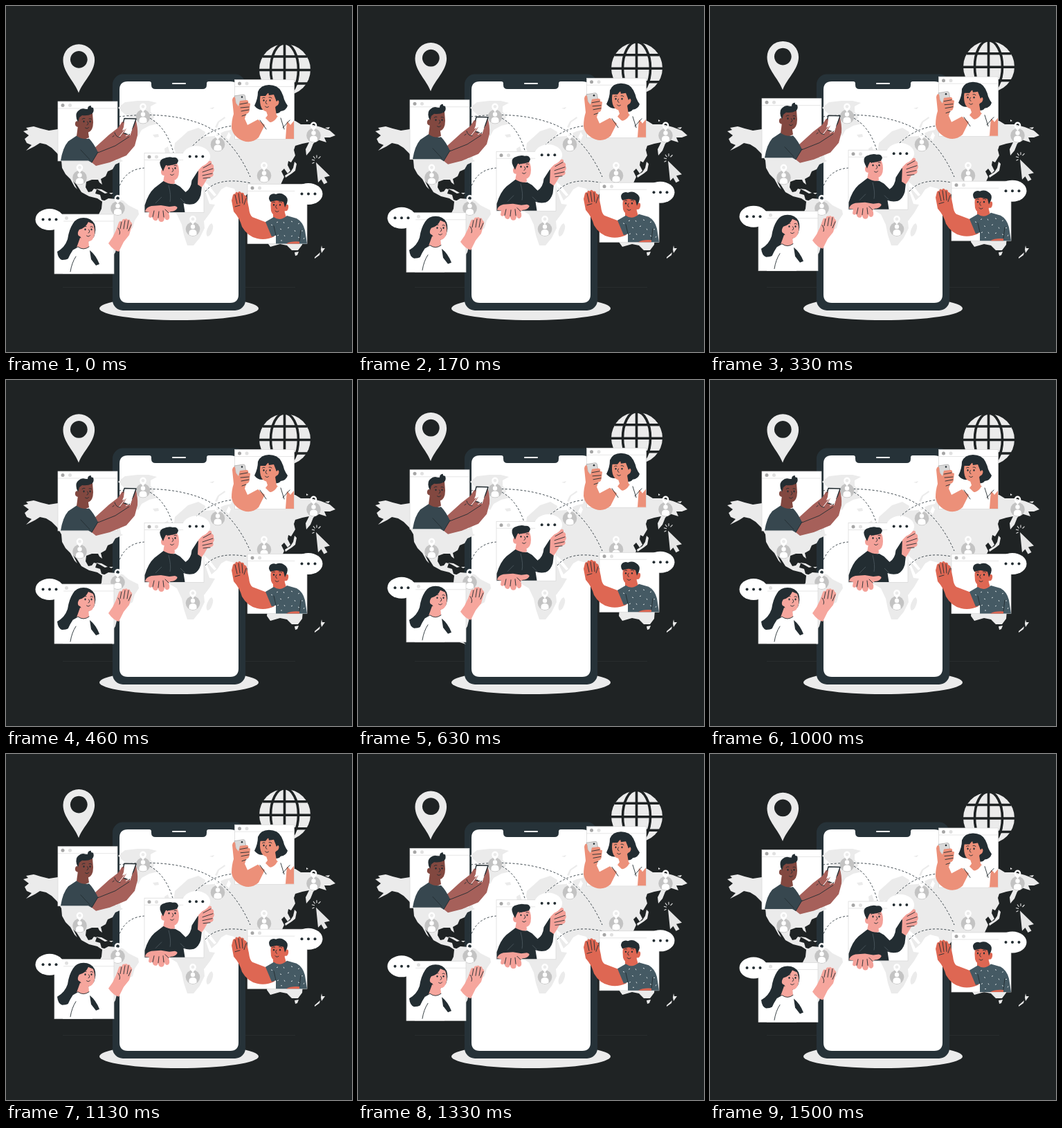
Recreate the animation shown at these times as an HTML page. Size 500 by 500 pixels, loop 1540 ms.

```html
<!DOCTYPE html>
<html lang="en">
<head>
<meta charset="utf-8">
<title>Video call around the world</title>
<style>
  html, body { margin: 0; width: 100%; height: 100%; overflow: hidden; background: #1f2324; }
  svg { display: block; width: 100vw; height: 100vh; }
  .ink { fill: #232d32; }
  .line { fill: none; stroke: #232d32; stroke-width: .9; stroke-linecap: round; stroke-linejoin: round; }
  .route { fill: none; stroke: #263238; stroke-width: .9; stroke-dasharray: 3 2.5; }
  .brown { fill: #824840; } .brownArm { fill: #a6605a; }
  .peach { fill: #ec9079; } .pink { fill: #f4a199; } .rose { fill: #f6a69d; } .red { fill: #de6753; }
</style>
</head>
<body>
<svg viewBox="0 0 500 500">
  <defs>
    <g id="window">
      <rect width="86" height="86" fill="#fff" stroke="#d6d6d6" stroke-width=".7"/>
      <path d="M0 10H86" stroke="#dcdcdc" stroke-width=".7"/>
      <circle cx="7" cy="5.5" r="2.5" fill="#a6a6a6"/>
      <circle cx="17.5" cy="5.5" r="2.5" fill="#e0e0e0"/>
    </g>
    <g id="bubble">
      <ellipse rx="20.5" ry="15.5" fill="#fff"/>
      <g class="ink"><circle cx="-9.5" r="2"/><circle r="2"/><circle cx="9.5" r="2"/></g>
    </g>
    <g id="person">
      <circle r="10.3" fill="#c3c3c3"/>
      <g fill="#fff">
        <circle cy="-3.5" r="3.2"/>
        <path d="M-5.5 8V5q0-4.5 5.500-4.500T5.500 5v3Q0 11-5.500 8Z"/>
        <path fill-rule="evenodd" d="M0-6C-1.500-9.500-4.800-11-4.800-14.600a4.800 4.800 0 0 1 9.600 0C4.800-11 1.500-9.500 0-6ZM0-17a2.400 2.400 0 1 0 .01 0Z"/>
      </g>
    </g>
    <g id="face">
      <g class="ink"><ellipse cx="-5" cy="-2" rx="1.1" ry="1.4"/><ellipse cx="4" cy="-2" rx="1.1" ry="1.4"/></g>
      <path class="line" d="M-7.500-5.500q2-2 4-1M2.500-6q2-1 3.500.5M0-2q3 4-.5 5M-3 7q3 2.500 5-.5"/>
    </g>
  </defs>

  <path d="M82 406.500H418" stroke="#2b3032" stroke-width=".8"/>
  <ellipse cx="250" cy="437" rx="115" ry="17" fill="#ebebeb"/>
  <rect x="154" y="98.500" width="192" height="341.500" rx="15" fill="#263238"/>
  <path fill="#fff" d="M176 109H207q3 0 3 3v2q0 6 6 6H284q6 0 6-6v-2q0-3 3-3H324q12 0 12 12V417q0 12-12 12H176q-12 0-12-12V121q0-12 12-12Z"/>
  <path d="M241 112H259" stroke="#fff" stroke-width="2" stroke-linecap="round"/>

  <!-- world map -->
  <g fill="#ebebeb">
    <path d="M25 181L32 179 29 176 40 174 50 177 62 180 75 178 140 176 162 192 166 222 169 224 158 229 154 236 147 239 144 246 137 250 139 258 135 255 133 251 124 251 116 254 115 262 119 269 124 268 127 264 131 265 129 271 136 273 138 280 148 283 141 284 132 278 120 275 109 269 102 258 97 253 103 265 99 261 93 250 86 243 81 234 80 223 74 213 66 205 58 200 49 198 41 203 29 209 37 201 30 198 27 192 33 187Z"/>
    <path d="M130 264l8 1 9 5-4 1-7-4ZM149 270l6 0-3 2Z"/>
    <path d="M139 283l9-5 11 1 10 2 8 7 14 7 1 6-6 9-3 11-9 5-5 9-8 9-3 12-6 9-2 12 6 5-9-3-3-20 2-23-9-17-4-16 5-10Z"/>
    <path d="M162 147l10-8 18-2 16 0 12 3-9 5 0 8 6 6-3 5 8 6-13 3-11 6-5 9-5-4-1-12-6-10-10-8Z"/>
    <path d="M212 186l8-1 1 4-6 1ZM229 206l5-3 3 9-7 2ZM294 148l7-2-2 3Z"/>
    <path d="M302 175l4-8 10-7 1 2-9 6-3 8Z"/>
    <path d="M243 206L244 198 253 190 263 181 278 176 288 182 286 189 300 188 316 181 325 179 330 166 418 166 426 171 440 171 455 175 468 180 476 187 468 190 460 190 463 197 450 193 444 199 440 209 434 216 433 207 438 197 428 199 418 202 416 208 418 216 412 226 408 224 407 230 411 238 407 242 402 235 398 239 402 247 397 258 385 270 350 270 338 285 330 264 318 261 311 265 305 274 297 281 288 262 284 250 276 225 250 222 254 209 262 203 264 194 272 188 270 197 262 208 246 214Z"/>
    <path d="M225 262L286 262 294 286 302 287 295 299 286 311 287 321 280 335 271 346 262 346 257 331 254 316 247 301 235 294Z"/>
    <path d="M297 314q4 3 1 11t-7 8q-3-4 0-11t6-8Z"/>
    <path d="M417 225l3 3-2 10-5 4-9 6-1-3 8-5 4-6ZM434 164l3 2-3 1ZM461 176l7-1-2 3Z"/>
    <path d="M378 330l12-12 14-4 8 3 8-2 9 18-1 12-6 8-9 0-7-7-10-2-14 4-5-7ZM417 356l6-1-2 5-3 1Z"/>
    <path d="M456 346l1 4 4 0-5 7-1-5ZM454 356l-1 4-7 5 0-2Z"/>
  </g>
  <path fill="#fff" d="M286 253l8 7 10 13-3 2-10-11-7-7ZM318 190l4-8 3 5-3 7Z"/>
  <g class="route">
    <path d="M163 160Q230 152 278 169T353 247"/>
    <path d="M198 158Q230 168 242 212"/>
    <path d="M161 270Q169 235 202 234"/>
    <path d="M266 206Q294 175 331 173"/>
    <path d="M288 268Q306 246 354 256"/>
  </g>
  <use href="#person" x="198" y="160"/>
  <use href="#person" x="106.500" y="248"/>
  <use href="#person" x="161.500" y="292.500"/>
  <use href="#person" x="306" y="200"/>
  <use href="#person" x="444.500" y="187"/>
  <use href="#person" x="373" y="245"/>
  <use href="#person" x="270" y="322.500"/>

  <g id="floating">
    <path fill="#ebebeb" fill-rule="evenodd" d="M105 125.500C99 109 82.500 96 82.500 78a22.800 22.800 0 0 1 45.600 0C128 96 111 109 105 125.500ZM105.300 65a12.400 12.400 0 1 0 .01 0Z"/>

    <circle cx="403" cy="92" r="37" fill="#ebebeb"/>
    <g fill="none" stroke="#1f2324" stroke-width="3.600">
      <path d="M402.500 54V130M365 92.500H441M371 73H435M371 112H435"/>
      <ellipse cx="402.500" cy="92" rx="20" ry="38"/>
    </g>

    <path fill="#e6e6e6" d="M448 226l20 19.500-8 2 4.500 7.500-5 2.500-4-7-4.500 4.500Z"/>
    <path d="M442 222l4 1M444 217l2.500 3.500M449 215.500v4M454.500 217.500l-3 3M442.500 227.500l3-1.500" stroke="#e6e6e6" stroke-width="1.100"/>

    <!-- man with phone -->
    <use href="#window" x="75" y="138"/>
    <path class="brown" d="M104 173l14 4 2 13-9 4-9-6Z"/>
    <path class="brown" d="M103 158q9-9 22-3l1 13q0 13-8 15-9 1-14-8-5-1-4-6 1-4 4-2Z"/>
    <path class="ink" d="M104 168l-2-5q-2-9 3-12 4-4 10-2l3 0q0-5 5-5-1 3 3 3 2 6-2 9-6 3-14 2l-4 3Z"/>
    <use href="#face" x="117.500" y="169"/>
    <path class="brownArm" d="M127 206l22-20 13-10 6-9 6 4 7-1 6-7q4 13 3 24l-4 15-12 14-24 10-20 5-10-8Z"/>
    <path fill="#37474f" d="M79 223.500q3-19 11-28l12-8q8 6 18 4 7 7 13 20l-9 15-5-3Z"/>
    <path class="line" d="M121 222l-13-14M133 211l-9 15M133 212l25-10 20-13M154 189l12-9"/>
    <path d="M171 162.500l17 .5-8 23-14-3Z" fill="#fff" stroke="#232d32" stroke-width="1.400" stroke-linejoin="round"/>
    <path class="brownArm" d="M156 185l9-12 6-6-1 8-2 5 6-3-4 7-6 5-7 1ZM184 175l4 3 0 7-6 5-4-1Z"/>
    <path d="M163 190l7-9 3-4M173 188l5-3-4-1M182 178l-3 9" fill="none" stroke="#fff" stroke-width="1"/>
    <path class="line" d="M157 183q2 7 8 7"/>

    <!-- woman taking a selfie -->
    <use href="#window" x="330.500" y="106.500"/>
    <path class="ink" d="M364 124q4-10 16-10 13 0 18 10 3 6 4 11 2 5 5 9-2 7-10 8-3 4-9 3l-16-5q-8 1-13-6 5-10 5-20Z"/>
    <path class="peach" d="M375 149l14-3 2 12 4 4-12 8-8-8 3-4ZM399 165q9 1 12 7l5-6v26h-14Z"/>
    <path class="peach" d="M368 128q10-1 19-5l4 15 2-2q3 2 0 7l-3 2q-4 8-12 8-8-1-10-9-2-8 0-16Z"/>
    <path class="ink" d="M365 130q4-12 16-11 9 1 12 15l-2 4-4-10-7 1-1-4-4 5Z"/>
    <use href="#face" transform="translate(376.500 138.500) scale(-1 1)"/>
    <path fill="#fff" d="M361 192q1-19 13-30 3 6 9 6 6-2 9-8 8 1 14 5l-2 27Z"/>
    <path fill="#d9d9d9" stroke="#999" stroke-width=".6" d="M330 130l13-2q2 0 2.500 2l2.500 15-14 3Z"/>
    <circle cx="341" cy="131.500" r="1.300" class="ink"/>
    <path class="peach" d="M327 136q1-6 4-4l1 8 4 5 2-8 9-1q4 0 3 4l3 1-1 8q0 6-5 7l-2 7 4 9 15-8 10 8-9 18q-10 9-22 5-15-6-17-19 0-11 3-20Z"/>
    <path class="line" d="M338 142l11-2M339 147l12-1M340 152l11-2M347 157l-6 2M397 162l5 16M367 165l9 13M400 176l10-11"/>

    <!-- man grabbing the frame -->
    <use href="#window" x="200" y="212.500"/>
    <path class="pink" d="M229 243l14 3 1 10-8 4-9-5Z"/>
    <path class="pink" d="M227 230l18-5q5 4 5 14 0 12-8 13-8 1-13-7-5 0-5-5t4-4Z"/>
    <path class="ink" d="M227 239l-3-6q-4-9 2-12 9-4 15-2 7-1 8 5l-2 4q-9 3-16 2l-2 4Z"/>
    <use href="#face" x="240.500" y="236.500"/>
    <path class="ink" d="M200.500 298V288q5-17 14-25l13-10q8 5 17 4l7 4 8 8q8-5 9-17l9-14 6 18-2 17q-3 10-10 13-8 2-15-1l2 13Z"/>
    <path d="M216 285l9-9M235 259q4 15 2 24M252 278l7 7" stroke="#56646b" stroke-width=".7" fill="none"/>
    <path class="pink" d="M278 237l7-7 8-6q5-1 4 4 4 1 3 6 2 3-1 7 2 4-2 6l-6 2-4 7-4 6-6-4Z"/>
    <path class="line" d="M285 234l11-6M284 240l15-5M284 245l14-3M285 249l10-1"/>
    <path class="pink" d="M201 297q1-6 9-8l14-1 12 2 8-1q5 1 3 4-3 4-9 4l-3 2q3 8-1 10-4 1-5-4 0 7-4 7-5 0-5-6-1 5-5 4-4-2-3-6-4 4-6 0l1-6Z"/>
    <path class="line" d="M212 305l2-9M220 306l1-9M228 305l-1-9M235 299l-5-5"/>

    <!-- woman waving -->
    <use href="#window" x="70" y="301"/>
    <path class="ink" d="M97 314q5-8 15-8 11 0 16 9 3 8-1 19l-17 14q-8 3-11 10-7 9-18 9-6-2-7-12 11-6 15-18 2-14 8-23Z"/>
    <path class="rose" d="M107 335l12 2 1 11-7 6-11-5Z"/>
    <path class="rose" d="M106 323q9-2 13-11l7 3q3 8 2 15-2 10-9 10-8 0-12-7-4-1-3-6 1-3 2-4Z"/>
    <use href="#face" x="119.500" y="325"/>
    <path fill="#fff" d="M82 387q6-22 15-35l7-4q8 6 16 0 6 4 6 12l-1 27Z"/>
    <path class="line" d="M93 384q2-13 8-22M97 352l7-4q8 6 16 0"/>
    <path class="ink" d="M121 353q9 7 14 20l-5 2-7-9Z"/>
    <path class="rose" d="M148 343q7-9 11-19l4-11q2-4 4-1 1-5 5-4 2-2 4 1 3-2 4 3 3 1 2 5l-4 14-8 10-7 14Q155 353 148 343Z"/>
    <path class="line" d="M167 312l-2 10M172 310l-2 12M177 310l-2 12M181 316l-4 9M162 321q4 5 2 9"/>

    <!-- man in patterned shirt -->
    <use href="#window" x="349" y="257.500"/>
    <path class="red" d="M326 281l2-8q2-3 3-1 1-5 4-2 2-4 5 0 4-1 4 3 4 1 4 5l3 14q1 10 5 13l21 8 9 3 2 17q-13 6-25 3-14-3-22-17-3-12-12-22Z"/>
    <path class="line" d="M331 273l3 13M336 271l2 14M341 272l1 13M347 278l-3 9M331 290l7-2"/>
    <path class="red" d="M386 297l16-2 3 11-8 6-11-5Z"/>
    <path class="red" d="M383 280l21-1 1 8q4-1 3 5-1 5-5 4-3 8-11 8-7-1-9-8-1-8 0-16Z"/>
    <path class="ink" d="M382 283q-4-6 0-10 4-3 8-1 7-3 12 1 7 4 4 12l-3 6-2-8-10-2Z"/>
    <use href="#face" transform="translate(391 289.500) scale(-1 1)"/>
    <path fill="#455a64" d="M375 312l12-7q9 7 19-2l14 4q9 5 12 17l3 19.500h-45v-12l-6 2Z"/>
    <path d="M383 316l2 1M391 313l2-1M401 312l1 2M412 311l2 1M422 315l2-1M396 322l2 1M407 321l2-1M417 324l1 2M427 325l2 0M392 332l2-1M402 331l1 2M412 333l2-1M422 334l2 1M397 339l2 0M430 337l1-2" stroke="#d3dadd" stroke-width="1"/>
    <path class="line" d="M390 331l-3-13M424 340l2-16"/>
    <path class="red" d="M405 343.500q7-4 19-3v3Z"/>

    <use href="#bubble" transform="translate(275 217.500) scale(.98)"/>
    <use href="#bubble" x="63" y="308.500"/>
    <use href="#bubble" x="437" y="271.500"/>
  </g>
</svg>
<script>
  const LOOP = 1540, LIFT = 10, LEAD = 40;
  const floating = document.getElementById('floating');

  function draw() {
    const phase = ((performance.now() + LEAD) % LOOP) / LOOP;
    const rise = LIFT * (1 - Math.abs(2 * phase - 1));
    floating.setAttribute('transform', `translate(0 ${0.5 - rise})`);
    requestAnimationFrame(draw);
  }
  draw();
</script>
</body>
</html>
```
